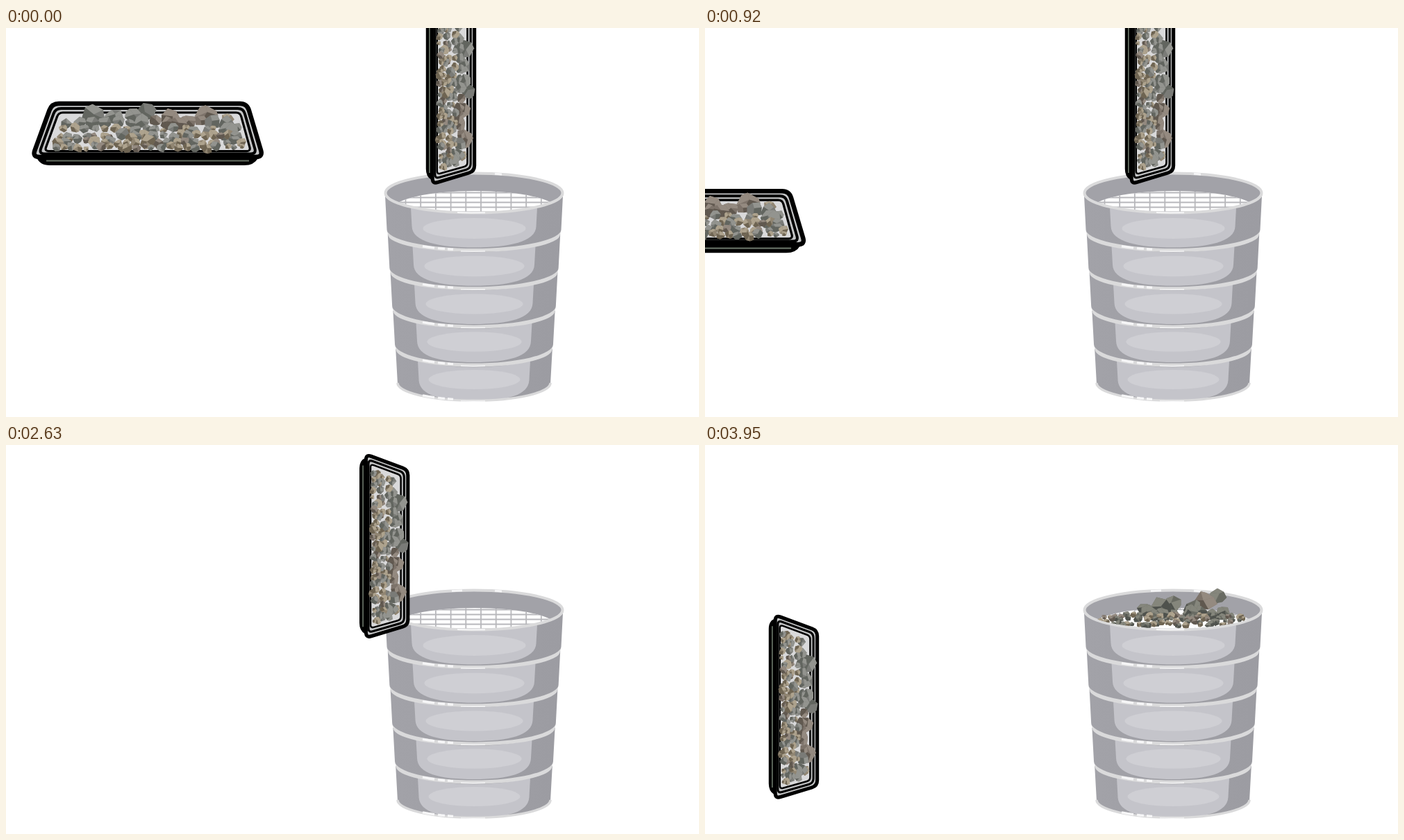
An HTML page for the animation above (3.99 s loop, 998 px wide and 561 px high).

```html
<!DOCTYPE html>
<html lang="en">
<head>
<meta charset="utf-8">
<title>Gravel and sieve stack</title>
<style>
  html, body { margin: 0; width: 100%; height: 100%; overflow: hidden; background: #fff; }
  svg { display: block; width: 100vw; height: 100vh; }
</style>
</head>
<body>
<svg id="stage" viewBox="0 0 998 561"></svg>
<script>
const LOOP = 3990, STEP = 40, SECOND = 1990;
const stage = document.getElementById('stage');

let seed = 7;
const rnd = () => (seed = (seed * 16807) % 2147483647) / 2147483647;
const vary = (n, by) => n + (rnd() - .5) * 2 * by;
const pick = list => list[Math.floor(rnd() * list.length)];
const f = n => n.toFixed(1);
const path = (d, fill, stroke = 'none', w = 0) =>
  `<path d="${d}" fill="${fill}" stroke="${stroke}" stroke-width="${w}" stroke-linejoin="round"/>`;
const ellipse = (cx, cy, rx, ry, look = '') =>
  `<ellipse cx="${cx}" cy="${cy}" rx="${rx}" ry="${ry}" ${look}/>`;
const poly = pts => 'M' + pts.map(p => f(p[0]) + ',' + f(p[1])).join('L') + 'Z';

// polygon with rounded corners
function rounded(pts, r) {
  const toward = (a, b) => {
    const k = r / Math.hypot(b[0] - a[0], b[1] - a[1]);
    return f(a[0] + (b[0] - a[0]) * k) + ',' + f(a[1] + (b[1] - a[1]) * k);
  };
  return pts.map((p, i) => {
    const prev = pts[(i + pts.length - 1) % pts.length], next = pts[(i + 1) % pts.length];
    return (i ? 'L' : 'M') + toward(p, prev) + 'Q' + p + ' ' + toward(p, next);
  }).join('') + 'Z';
}

// ---- stones: light, middle and dark tone of each kind
const TONES = {
  grey: ['#93948f', '#7a7b77', '#62655f'],
  brown: ['#948a80', '#7d736a', '#60584f'],
  tan: ['#aea38e', '#918673', '#6e6452'],
  moss: ['#85867c', '#696b63', '#4f524d']
};

function drawStone({ x, y, r, kind }) {
  const n = 7, turn = rnd() * 6.28, tones = TONES[kind];
  const pts = Array.from({ length: n }, (_, i) => {
    const a = turn + vary(i, .3) / n * 6.283, q = r * vary(1.03, .2);
    return [x + Math.cos(a) * q, y + Math.sin(a) * q * .92];
  });
  const mid = [vary(x, r * .25), y - rnd() * r * .3];
  const facet = (a, b) => {
    const ring = [mid];
    for (let i = a; i <= b; i++) ring.push(pts[i % n]);
    const low = ring.reduce((s, p) => s + p[1], 0) / ring.length - y;
    const tone = low < -r * .18 ? 0 : low > r * .18 ? 2 : pick([0, 1, 2]);
    return path(poly(ring), tones[tone]);
  };
  return path(poly(pts), tones[1]) + facet(0, 2) + facet(2, 4) + facet(5, 7);
}

// evenly spread stones with some scatter
const row = (count, x0, x1, y, r, kindAt) => Array.from({ length: count }, (_, i) => {
  const k = (i + .5) / count;
  return { x: vary(x0 + (x1 - x0) * k, 4), y: vary(y, 3), r: r * vary(1, .3), kind: kindAt(k) };
});
const big = (x, y, r, kind) => ({ x, y, r, kind });
const heap = stones => stones.sort((a, b) => a.y - b.y).map(drawStone).join('');

const mixed = () => pick(['tan', 'grey', 'tan', 'brown', 'grey']);
const byPlace = k => k > .52 && k < .85 ? 'brown' : 'grey';

const load = () => heap([
  ...row(14, 82, 325, 136, 9, byPlace),
  ...row(18, 78, 338, 146, 6, mixed),
  ...row(22, 74, 340, 155, 7, mixed),
  ...row(24, 66, 344, 164, 6.5, mixed),
  ...row(24, 64, 346, 172, 5.5, mixed),
  big(125, 126, 15, 'grey'), big(155, 127, 12, 'grey'), big(182, 125, 12, 'grey'),
  big(202, 121, 13, 'grey'), big(237, 130, 14, 'brown'), big(287, 125, 15, 'brown'),
  big(319, 131, 9, 'tan'), big(320, 149, 17, 'grey'), big(205, 164, 11, 'tan')
]);

// ---- tray: three nested rims, each set in by d
function rim(d, round, w, fill) {
  const top = 109 + d, low = 186 - d * .65;
  return path(rounded([[66 + d * .75, top], [347 - d * .75, top], [370 - d * 1.35, low], [38 + d * 1.35, low]], round),
    fill, '#000', w);
}

const tray =
  path('M46,186Q50,196 63,196H343Q356,196 361,187Z', '#000', '#000', 4) +
  path('M58,191.5H350', 'none', '#667064', 2.2) +
  rim(0, 10, 6.5, '#c6c7c8') + rim(7, 8, 4, '#c3c4c5') + rim(13, 6, 3.2, '#d9d9da') +
  load();

// ---- sieve stack
const CX = 674, RIM = '#dadadb', LAST = 4;
const bow = (x, cy, rx, ry) => cy + ry * Math.sqrt(Math.max(0, 1 - ((x - CX) / rx) ** 2));

// bright piece of an elliptic edge
function glint(x0, x1, cy, rx, ry, w) {
  const pts = [x0, (x0 + x1) / 2, x1].map(x => f(x) + ',' + f(bow(x, cy, rx, ry)));
  return path('M' + pts.join('L'), 'none', '#f6f6f7', w);
}

function ring(i) {
  const last = i === LAST;
  const w1 = 128 - i * 3.8, w2 = 125.5 - i * 3.85, pw = 91 - i * 2.5;
  const y1 = 242 + i * 55.3, y2 = 291 + i * 55.2, ry = last ? 25.5 : 28;
  const top = y1 + 17, floor = y2 + 25.5;
  const half = (w, y, h) => `M${CX - w},${y}A${w},${h} 0 0 0 ${CX + w},${y}`;

  const body = half(w2, y2, ry) + `L${CX + w1},${y1}H${CX - w1}Z`;
  const panel = `M${CX - pw},${top}Q${CX},${top + 18} ${CX + pw},${top}L${CX + pw - 1.5},${y2 - 5}` +
    `C${CX + pw - 2},${floor - 8} ${CX + 50},${floor} ${CX},${floor}` +
    `C${CX - 50},${floor} ${CX - pw + 2},${floor - 8} ${CX - pw + 1.5},${y2 - 5}Z`;
  const band = half(w2 + .4, y2 - 1, ry) +
    `L${CX + w2 - 1.6},${y2 + 7}A${w2 - 2},25 0 0 1 ${CX - w2 + 1.6},${y2 + 7}Z`;

  const gy = y2 + (last ? 0 : 2);
  let out = path(body, 'url(#steel)') + path(panel, '#c4c4ca') +
    ellipse(CX + .5, 289 + i * 54.5, 74 - i * 2, 15 - i * .25, 'fill="#cfcfd4"') +
    (last ? path(half(w2, y2, ry), 'none', RIM, 3.5) : path(band, RIM));
  for (const [x, len] of [[600, 17], [622, 10], [636, 8]]) out += glint(x, x + len, gy, w2, ry - 1, 3.4);
  return out + glint(655, 690, gy + 2, w2, ry - 1, 1.4);
}

const opening = look => ellipse(CX, 238, 127.5, 28.5, look);

function mesh() {
  let d = '';
  for (let x = 575.5; x < 800; x += 21.7) d += `M${f(x)},230V270`;
  for (let y = 237.5; y < 270; y += 7) d += `M550,${y}H800`;
  return '<g clip-path="url(#hole)"><g clip-path="url(#net)">' +
    path('M540,200H810V280H540Z', '#fff') + path(d, 'none', '#b7b7bb', 1.8) + '</g></g>';
}

const sieve = [4, 3, 2, 1, 0].map(ring).join('') + opening('fill="#a2a2a8"') + mesh() +
  opening(`fill="none" stroke="${RIM}" stroke-width="4"`) +
  glint(642, 657, 238, 127.5, -28.5, 3) + glint(704, 714, 238, 127.5, -28.5, 3) +
  glint(650, 690, 238, 127.5, 28.5, 2);

const rubble = () => pick(['moss', 'moss', 'tan', 'brown']);
const pile = '<g clip-path="url(#above)">' + ellipse(675, 262, 116, 24, 'fill="#fff"') + heap([
  ...row(20, 572, 776, 246, 5, rubble),
  ...row(28, 568, 782, 251, 4.5, rubble),
  ...row(30, 576, 770, 258, 4.5, rubble),
  ...row(9, 628, 752, 243, 9, () => 'moss'),
  big(632, 237, 10, 'moss'), big(657, 235, 15, 'moss'), big(674, 229, 11, 'moss'),
  big(702, 238, 14, 'moss'), big(721, 225, 15, 'brown'), big(738, 218, 13, 'moss')
]) + '</g>';

stage.innerHTML = `<defs>
  <linearGradient id="steel"><stop offset="0" stop-color="#a2a2a8"/><stop offset="1" stop-color="#9c9ca2"/></linearGradient>
  <clipPath id="hole">${opening()}</clipPath>
  <clipPath id="net">${ellipse(675, 262, 119, 27)}</clipPath>
  <clipPath id="above"><path d="M548,238A126,26.5 0 0 0 800,238V150H548Z"/></clipPath>
</defs>
<rect width="998" height="561" fill="#fff"/>
${sieve}
<g id="pile">${pile}</g>
<g id="flat">${tray}</g>
<g id="tall"><g transform="matrix(0 .797 -.785 0 760.2 -70)">${tray}</g></g>`;

const [flat, tall, pileNode] = ['flat', 'tall', 'pile'].map(id => document.getElementById(id));

// gentle start and stop
function glide(t, start, length) {
  const k = Math.min(1, Math.max(0, (t - start) / length));
  return k * k * k * (10 - 15 * k + 6 * k * k);
}
const shift = (node, dx, dy, k) => node.setAttribute('transform', `translate(${f(dx * k)} ${f(dy * k)})`);

function draw(ms) {
  const base = ms < SECOND ? 0 : SECOND;
  const t = base + Math.floor((ms - base) / STEP + 1e-6) * STEP;
  shift(flat, -535, 299, glide(t, 40, 1920));
  shift(tall, -513, 285, glide(t, 2046, 1840));
  pileNode.style.display = t >= 3950 ? '' : 'none';
}

function tick() {
  draw(performance.now() % LOOP);
  requestAnimationFrame(tick);
}
tick();
</script>
</body>
</html>
```
